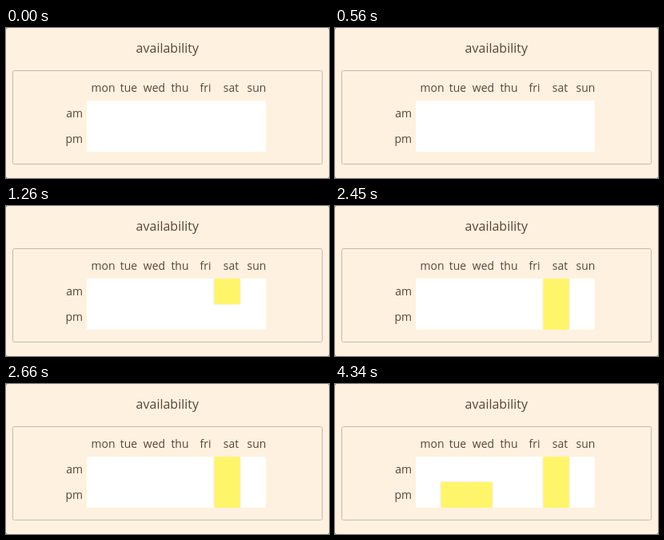
An HTML page for the animation above (7140 ms loop, 404 px wide and 188 px high).

```html
<!DOCTYPE html>
<html lang="en">
<head>
<meta charset="utf-8">
<title>availability</title>
<style>
  html, body { margin: 0; width: 100%; height: 100%; overflow: hidden; background: #8b857c; }
  svg { display: block; }
  text { font: 14px "Open Sans", "Noto Sans", sans-serif; fill: #594636; }
  .title { font-size: 16px; }
  .middle { text-anchor: middle; }
  .end { text-anchor: end; }
  #cells { fill: #fff56b; filter: drop-shadow(0 0 1.5px #eadfb8); }
</style>
</head>
<body>
<svg id="stage" width="404" height="188" viewBox="0 0 404 188">
  <rect width="404" height="188" rx="2.5" fill="#fff1df"/>
  <text class="title middle" x="201.8" y="31">availability</text>
  <rect x="8.5" y="53.5" width="387" height="117" rx="2" fill="none" stroke="#c5baaa"/>
  <g id="labels"></g>
  <rect x="101" y="91" width="224" height="64" rx="2" fill="#fff"/>
  <svg x="101" y="91" width="224" height="64"><g id="cells"></g></svg>
</svg>
<script>
const LOOP = 7140, CELL = 32;
const days = ["mon", "tue", "wed", "thu", "fri", "sat", "sun"];
const halves = ["am", "pm"];
const picks = [
  { at: 1260, day: 5, half: 0 },
  { at: 2450, day: 5, half: 1 },
  { at: 3710, day: 1, half: 1 },
  { at: 4340, day: 2, half: 1 },
];

function add(parentId, tag, attributes, text = "") {
  const node = document.createElementNS("http://www.w3.org/2000/svg", tag);
  for (const name in attributes) node.setAttribute(name, attributes[name]);
  node.textContent = text;
  return document.getElementById(parentId).appendChild(node);
}

days.forEach((day, i) =>
  add("labels", "text", { class: "middle", x: 121.5 + i * CELL, y: 80 }, day));
halves.forEach((half, i) =>
  add("labels", "text", { class: "end", x: 96, y: 112 + i * CELL }, half));

for (const pick of picks) {
  pick.node = add("cells", "rect", {
    x: pick.day * CELL - 0.4, y: pick.half * CELL, width: CELL, height: CELL,
  });
}

function draw() {
  const time = performance.now() % LOOP;
  for (const { at, node } of picks) {
    node.style.display = time >= at ? "" : "none";
  }
  requestAnimationFrame(draw);
}
draw();
</script>
</body>
</html>
```
